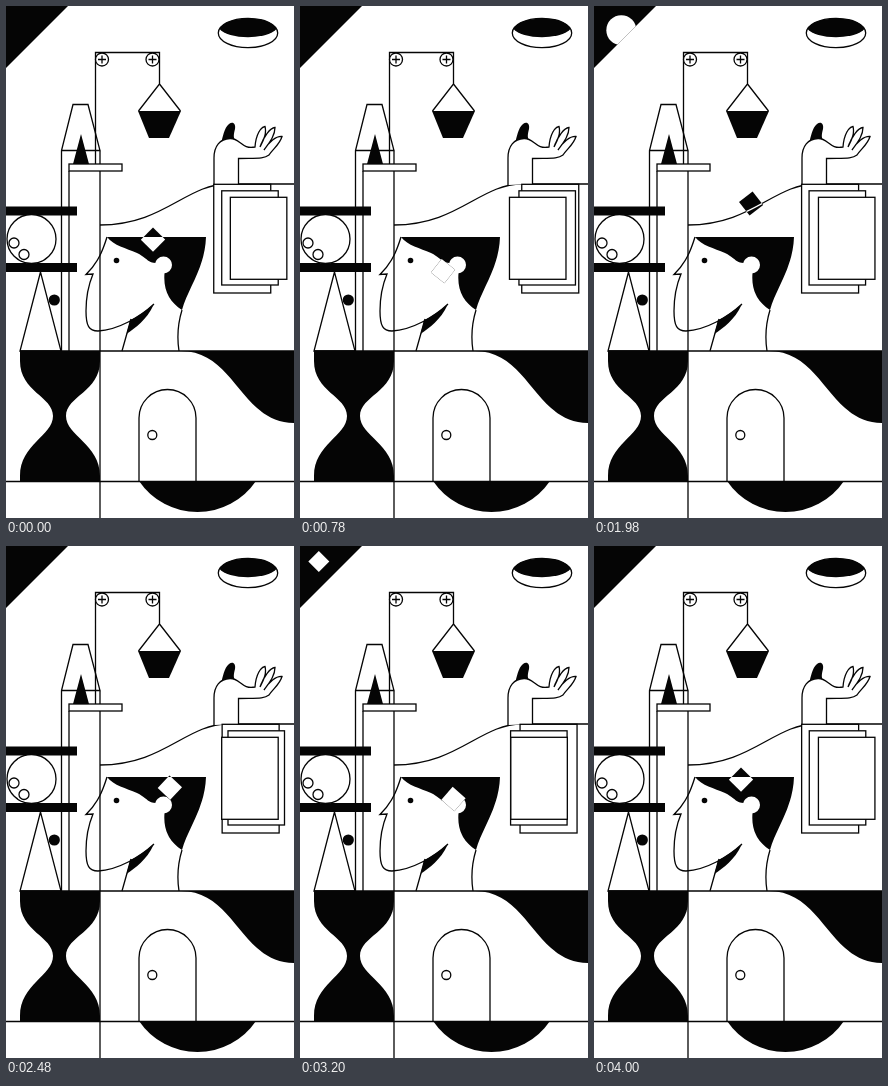
Animation, 288 px wide and 512 px high, one loop 4.02 s. Source, as an HTML page:

```html
<!DOCTYPE html>
<html lang="en">
<head>
<meta charset="utf-8">
<title>Line art loop</title>
<style>
html, body { margin: 0; width: 100%; height: 100%; overflow: hidden; background: #fff; }
svg { display: block; width: 100vw; height: 100vh; fill: #050505; stroke-width: 1.3; }
.line { fill: none; stroke: #050505; }
.paper { fill: #fff; stroke: #050505; }
.white { fill: #fff; }
</style>
</head>
<body>
<svg viewBox="0 0 288 512">
  <defs>
    <clipPath id="corner"><path d="M0 0H62L0 62Z"/></clipPath>
    <clipPath id="inHead"><path d="M80 231H200V345H80Z"/></clipPath>
    <clipPath id="inBlock"><use href="#block"/></clipPath>
    <path id="block" d="M-8.6-8.6H8.6V8.6H-8.6Z"/>
    <path id="slope" d="M94 219C158 219 180 178 222 178H288"/>
  </defs>

  <!-- corner window -->
  <path d="M0 0H62L0 62Z"/>
  <g clip-path="url(#corner)" class="white">
    <path class="shape" d="M0-8L9 7H-9Z"/>
    <circle class="shape" r="15"/>
    <path class="shape" d="M0-10.5L10.5 0L0 10.5L-10.5 0Z"/>
  </g>

  <!-- hole in the sky -->
  <ellipse class="paper" cx="242" cy="27" rx="29.7" ry="14.7"/>
  <path d="M213.5 23C220 9 264 9 270.5 23A30 12 0 0 1 213.5 23Z"/>

  <!-- pulleys and bucket -->
  <path class="line" d="M89.5 158V46.5H153.5V78L132.5 105M153.5 78L174.5 105"/>
  <circle class="paper" cx="96" cy="53.5" r="6.5"/>
  <circle class="paper" cx="146.5" cy="53.5" r="6.5"/>
  <path class="line" d="M92 53.5h8m-4-4v8M142.5 53.5h8m-4-4v8"/>
  <path d="M132 105H175L163 132H143Z"/>

  <!-- tower -->
  <path class="line" d="M55.5 345V144.5L67 98.5H82L94 144.5H55.5M63 165V345M94 144V512"/>
  <path d="M67 158L75 128L83 158Z"/>
  <rect class="paper" x="63" y="158" width="53" height="7"/>
  <path d="M0 200.5H71V209.5H0ZM0 257H71V266H0Z"/>
  <circle class="paper" cx="25.5" cy="233" r="24.5"/>
  <circle class="line" cx="8" cy="237" r="5"/>
  <circle class="line" cx="18" cy="248.5" r="5"/>
  <path class="paper" d="M34.5 266L14 345H55Z"/>
  <circle cx="48.3" cy="294" r="5.6"/>

  <!-- ground, hourglass and door -->
  <path class="line" d="M14 345H288M0 475.5H288"/>
  <path d="M14 345H94V355C94 386 60 390 60 410C60 430 94 438 94 470V475H14V470C14 438 47 430 47 410C47 390 14 386 14 355Z"/>
  <path d="M133 475A70.7 70.7 0 0 0 250 475Z"/>
  <path d="M175 345H288V417C235 417 229 345 175 345Z"/>
  <path class="line" d="M133 475V412a28.5 28.5 0 0 1 57 0V475"/>
  <circle class="line" cx="146.3" cy="429" r="4.5"/>

  <!-- hand and pages -->
  <use href="#slope" class="line"/>
  <path d="M215 137C217 131 218 122 223 118C227 115 230 118 229 123C228 127 227 131 229 134Z"/>
  <path class="paper" d="M208 179V152C208 140 214 133 224 132.5C234 132 236 144 249 141C250 128 255 121 259 120.5C261 128 257 135 254 141C258 130 264 122 269 121.5C269 130 263 137 258 144C263 136 270 130 276 130.5C274 138 267 143 263 149C258 153 250 152 232.5 152.5V178"/>
  <rect class="paper page" y="178.3" width="57" height="108.7"/>
  <rect class="paper page" y="184.8" width="56.5" height="94.2"/>
  <rect class="paper page" y="191.3" width="56.5" height="82"/>

  <!-- head -->
  <path class="line" d="M101 231C97 244 92 257 80 268.5L87 268C82 280 80 292 80 305C80 320 83 325 92 325C112 324 134 311 148 298M125 313L116 345M176 304C172 317 171 332 173 345"/>
  <path d="M148 298C140 315 130 321 120.5 328L124.5 314C133 310 141 304 148 298Z"/>
  <path d="M101 231H200C199 262 182 282 176 304C164 296 157 285 158.5 267L150 257C142 257 141 252 131 247C120 242 108 240 101 231Z"/>
  <circle class="white" cx="157.5" cy="259" r="8.5"/>
  <circle cx="110.5" cy="254.5" r="2.8"/>

  <!-- thought: black outside the head, white inside -->
  <use href="#block"/>
  <g clip-path="url(#inHead)"><use href="#block" class="white"/></g>
  <use href="#slope" clip-path="url(#inBlock)" fill="none" stroke="#fff"/>
</svg>
<script>
const LOOP = 4020, SWAY = LOOP / 2, TURN = LOOP / 3;
const shapes = document.querySelectorAll('.shape');
const pages = document.querySelectorAll('.page');
const block = document.getElementById('block');

// time, x, y of the turning points
const path = [
  [0, 147, 233.6], [600, 142, 272], [1650, 155, 184],
  [2900, 167, 262], [3200, 153.5, 253], [LOOP, 147, 233.6]
];

function along(t) {
  const i = path.findIndex(p => p[0] > t), a = path[i - 1], b = path[i];
  const u = (t - a[0]) / (b[0] - a[0]), ease = u * u * (3 - 2 * u);
  return a.map((v, j) => v + (b[j] - v) * ease);
}

function draw(t) {
  const w = 2 * Math.PI * t / SWAY;
  pages[0].setAttribute('x', 215 - 7.5 * Math.cos(w + .25));
  pages[1].setAttribute('x', 215 + 7 * Math.sin(w + .1));
  pages[2].setAttribute('x', 216.5 + 8 * Math.cos(w + .2));

  shapes.forEach((shape, i) => {
    const d = (t - i * TURN - 280) * .071;
    shape.setAttribute('transform', `translate(${d + 1.7} ${d - 1.5})`);
  });

  const [, x, y] = along(t);
  block.setAttribute('transform', `translate(${x} ${y}) rotate(${45 + (233 - y) * .2})`);
}

const start = performance.now();
function tick() {
  draw((performance.now() - start) % LOOP);
  requestAnimationFrame(tick);
}
tick();
</script>
</body>
</html>
```
